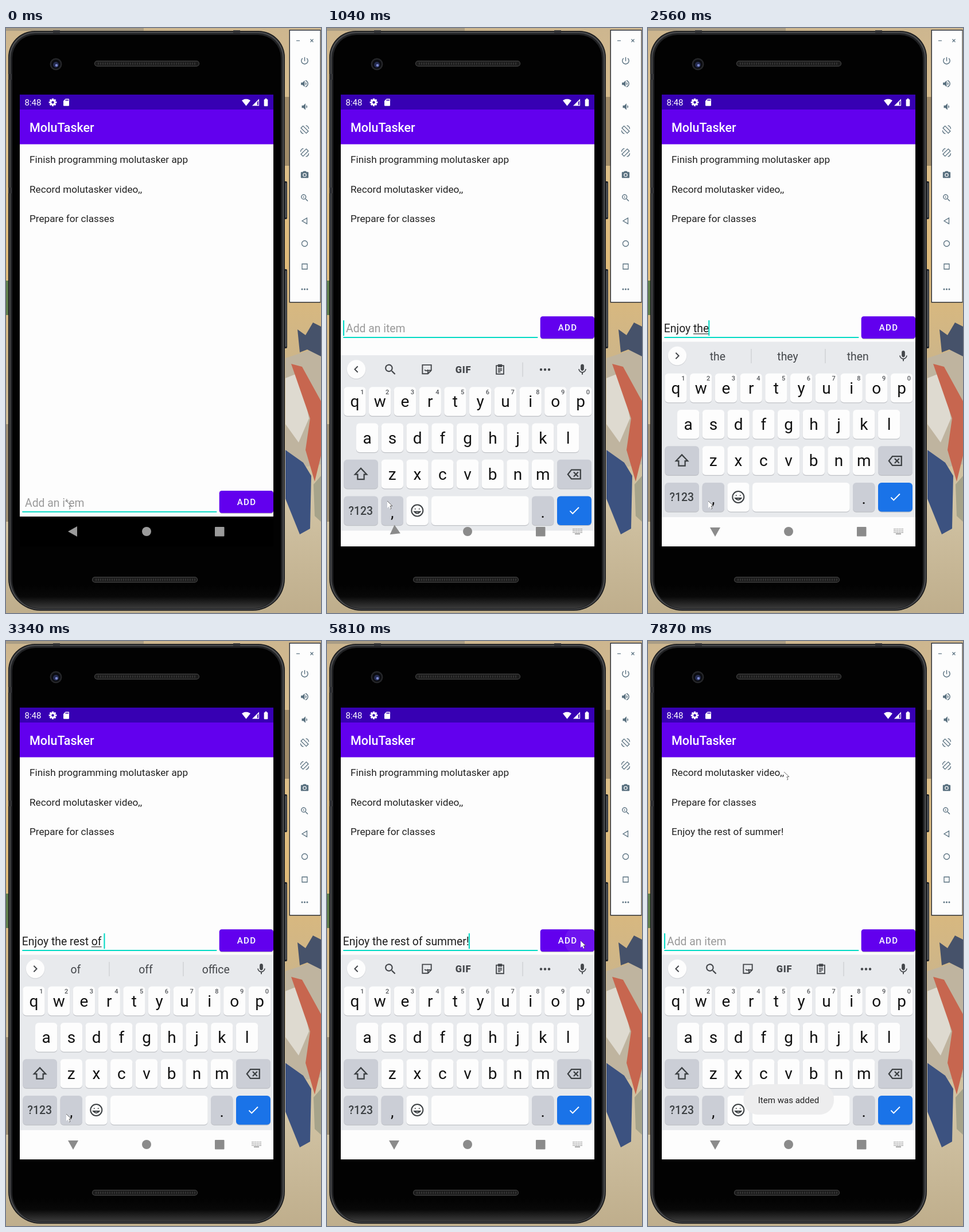
An HTML page with a canvas that plays this animation: 549x1019 px, repeating every 8 s.

```html
<!DOCTYPE html>
<html lang="en">
<head>
<meta charset="utf-8">
<title>Todo list</title>
<style>
  html, body { margin: 0; width: 100%; height: 100%; overflow: hidden; background: #d9bd8b; }
  canvas { display: block; width: 549px; height: 1019px; }
</style>
</head>
<body>
<canvas id="stage" width="549" height="1019"></canvas>
<script>
const ctx = document.getElementById('stage').getContext('2d');
const LOOP = 8000;
const FONT = 'Roboto, "Noto Sans", sans-serif';
const ROW = 51.6;
const TYPED = 'Enjoy the rest of summer!';
const ITEMS = ['Finish programming molutasker app', 'Record molutasker video,,',
  'Prepare for classes', 'Enjoy the rest of summer!'];

const ICONS = {
  power: 'M13 3h-2v10h2V3zm4.83 2.17l-1.42 1.42C17.99 7.86 19 9.81 19 12c0 3.87-3.13 7-7 7s-7-3.13-7-7c0-2.19 1.01-4.14 2.58-5.42L6.17 5.17C4.23 6.82 3 9.26 3 12c0 4.97 4.03 9 9 9s9-4.03 9-9c0-2.74-1.23-5.18-3.17-6.83z',
  louder: 'M3 9v6h4l5 5V4L7 9H3zm13.5 3c0-1.77-1.02-3.29-2.5-4.03v8.05c1.48-.73 2.5-2.25 2.5-4.02zM14 3.23v2.06c2.89.86 5 3.54 5 6.71s-2.11 5.85-5 6.71v2.06c4.01-.91 7-4.49 7-8.77s-2.99-7.86-7-8.77z',
  quieter: 'M18.5 12c0-1.77-1.02-3.29-2.5-4.03v8.05c1.48-.73 2.5-2.25 2.5-4.02zM5 9v6h4l5 5V4L9 9H5z',
  camera: 'M9 2L7.17 4H4c-1.1 0-2 .9-2 2v12c0 1.1.9 2 2 2h16c1.1 0 2-.9 2-2V6c0-1.1-.9-2-2-2h-3.17L15 2H9zm3 15a5 5 0 1 1 0-10 5 5 0 0 1 0 10zm0-8a3.2 3.2 0 1 0 0 6.4 3.2 3.2 0 0 0 0-6.4z',
  search: 'M15.5 14h-.79l-.28-.27A6.5 6.5 0 1 0 13.73 14.43l.27.28v.79l5 4.99L20.49 19zM9.5 14a4.5 4.5 0 1 1 0-9 4.5 4.5 0 0 1 0 9z',
  plus: 'M9 7h1v2h2v1h-2v2h-1v-2h-2v-1h2z',
  mic: 'M12 14c1.66 0 3-1.34 3-3V5c0-1.66-1.34-3-3-3S9 3.34 9 5v6c0 1.66 1.34 3 3 3zm5.3-3c0 3-2.54 5.1-5.3 5.1S6.7 14 6.7 11H5c0 3.41 2.72 6.23 6 6.72V21h2v-3.28c3.28-.48 6-3.3 6-6.72z',
  card: 'M18 2h-8L4 8v12c0 1.1.9 2 2 2h12c1.1 0 2-.9 2-2V4c0-1.1-.9-2-2-2zm-6 6h-2V4h2zm3 0h-2V4h2zm3 0h-2V4h2z',
  wifi: 'M12 21.5L.4 7C.9 6.6 5 3 12 3s11.2 3.6 11.6 4z',
  signal: 'M2 22H22V2zM17 20V11l3-4v13z',
  battery: 'M15.7 4H14V2h-4v2H8.3C7.6 4 7 4.6 7 5.3v15.4c0 .7.6 1.3 1.3 1.3h7.4c.7 0 1.3-.6 1.3-1.3V5.3c0-.7-.6-1.3-1.3-1.3z',
  check: 'M9 16.2L4.8 12l-1.4 1.4L9 19 21 7l-1.4-1.4z',
  shift: 'M12 3L21 12.5H17V20H7V12.5H3z',
  erase: 'M8 5H22V19H8L2.5 12zM11.5 8.5l7 7M18.5 8.5l-7 7',
  left: 'M15 6l-6 6 6 6',
  right: 'M9 6l6 6-6 6',
  clip: 'M5 5H19V21H5zM9 3.5h6V7H9zM8 11h8M8 14h8M8 17h5',
  sticker: 'M4 4H20V14L14 20H4zM20 14h-6v6M8 9h.1M15 9h.1M8 13q3 3.5 6 0',
  smile: 'M22 12a10 10 0 1 1-20 0 10 10 0 0 1 20 0zM8.5 8.5v1.5M15.5 8.5v1.5M7 14q5 6 10 0z',
  turn: 'M8 3L21 16L16 21L3 8zM15 2a9 9 0 0 1 7 8M9 22a9 9 0 0 1-7-8'
};
for (const name in ICONS) ICONS[name] = new Path2D(ICONS[name]);

// [time, value] steps
const typedLength = [[0, 0], [1540, 1], [1690, 2], [1810, 4], [1930, 5], [2080, 6], [2200, 7],
  [2320, 8], [2440, 9], [2680, 10], [2830, 11], [2950, 12], [3100, 14], [3220, 16], [3340, 18],
  [3460, 19], [3580, 20], [3700, 21], [3940, 22], [4060, 23], [4180, 24], [4480, 25], [5930, 0]];
const hints = [[0, ''], [1540, 'E Ex Even'], [1690, 'En End Enjoy'], [1810, 'Enj Enjoy Enjoyed'],
  [1930, 'Enjo Enjoy Enjoyed'], [2080, 'Enjoy Enjoyed Enjoys'], [2200, 't the to'],
  [2320, 'th the that'], [2440, 'the they then'], [2830, 'r are right'], [2950, 're read rest'],
  [3100, 'rest rests restaurant'], [3340, 'of off office'], [3460, 's so see'], [3580, 'su such sure'],
  [3700, 'sum summer sums'], [3940, 'summ summer summary'], [4180, 'summe summer summary'],
  [4330, 'summer summers summaries'], [4480, '']];
const caretOn = [[0, false], [120, true], [620, false], [740, true], [5150, false], [5560, true],
  [6470, false], [6830, true], [7330, false], [7870, true]];
const pointer = [[0, [105, 824]], [5000, [298, 726]], [5150, [394, 616]], [5290, [452, 540]],
  [5440, [446, 528]], [5560, [442, 522]], [6170, [400, 376]], [6320, [250, 269]],
  [6470, [241, 234]], [6590, [237, 228]]];
const keyboardDrop = [[0, null], [1040, 23.5], [1160, 5], [1280, 0]];
const backTurn = [[0, 0], [890, 8], [1040, 35], [1160, 75], [1280, 90]];
const ripple = [[0, 0], [5810, 28], [5930, 80], [6050, 0]];
const newItemAlpha = [[0, 0], [5930, 0.4], [6050, 1]];
const toastAlpha = [[0, 0], [6050, 0.35], [6170, 0.75], [6320, 1]];
const firstItemAlpha = [[0, 1], [7330, 0.5], [7450, 0]];
const listShift = [[0, 0], [7600, 27], [7750, ROW]];

function at(steps, t) {
  let value = steps[0][1];
  for (const [time, next] of steps) if (t >= time) value = next;
  return value;
}

function box(x, y, w, h, color, r = 0) {
  ctx.fillStyle = color;
  ctx.beginPath();
  ctx.roundRect(x, y, w, h, r);
  ctx.fill();
}

function disc(x, y, r, color) {
  ctx.fillStyle = color;
  ctx.beginPath();
  ctx.arc(x, y, r, 0, Math.PI * 2);
  ctx.fill();
}

function poly(points, color) {
  ctx.fillStyle = color;
  ctx.beginPath();
  for (let i = 0; i < points.length; i += 2) ctx.lineTo(points[i], points[i + 1]);
  ctx.fill();
}

function label(text, x, y, size, color, { weight = 400, align = 'left', spacing = 0 } = {}) {
  ctx.font = `${weight} ${size}px ${FONT}`;
  ctx.textAlign = align;
  ctx.letterSpacing = spacing + 'px';
  ctx.fillStyle = color;
  ctx.fillText(text, x, y);
}

function icon(name, x, y, size, color, stroke = 0, flip = 1) {
  ctx.save();
  ctx.translate(x, y);
  ctx.scale(flip * size / 24, size / 24);
  ctx.translate(-12, -12);
  if (stroke) {
    ctx.strokeStyle = color;
    ctx.lineWidth = stroke;
    ctx.stroke(ICONS[name]);
  } else {
    ctx.fillStyle = color;
    ctx.fill(ICONS[name], 'evenodd');
  }
  ctx.restore();
}

function faded(alpha, draw) {
  if (!alpha) return;
  ctx.globalAlpha = alpha;
  draw();
  ctx.globalAlpha = 1;
}

function verticalFade(y0, y1, ...colors) {
  const fade = ctx.createLinearGradient(0, y0, 0, y1);
  colors.forEach((c, i) => fade.addColorStop(i / (colors.length - 1), c));
  return fade;
}

function drawWallpaper() {
  box(0, 0, 549, 1019, verticalFade(0, 1019, '#cdb68f', '#dcc08c', '#dfba79', '#c9b48c', '#d2c4a5', '#bfae8c'));
  box(0, 0, 240, 5, '#a99c84');
  box(0, 440, 5, 60, '#5f7d4c');
  box(0, 690, 5, 170, '#9c8d72');
  box(486, 120, 9, 120, '#a08b68');
  poly([487, 575, 549, 555, 549, 760, 487, 770], '#bfb49f');
  poly([508, 525, 522, 535, 535, 513, 549, 520, 549, 572, 525, 560, 512, 565], '#46526a');
  poly([487, 610, 512, 600, 528, 680, 510, 722, 487, 690], '#dedad0');
  poly([497, 585, 516, 590, 549, 650, 549, 745, 538, 790, 522, 735, 530, 680], '#c7664f');
  poly([487, 735, 518, 757, 532, 780, 530, 872, 512, 882, 487, 820], '#3c5280');
  poly([536, 795, 549, 780, 549, 860, 538, 850], '#a6a38a');
}

function speaker(x, y, w) {
  box(x, y, w, 10, '#4b4b4b', 5);
  box(x + 1, y + 1, w - 2, 8, '#1c1c1c', 4);
  for (let i = x + 6; i < x + w - 5; i += 4) box(i, y + 3, 2, 4, '#333');
}

function drawPhone() {
  for (const [y, h] of [[267, 66], [420, 138]]) {
    box(483, y, 7, h, '#20242a', 2);
    box(487, y + 3, 1.5, h - 6, '#6a6d70');
  }
  box(4, 5, 482, 1010, '#17181a', [46, 46, 56, 56]);
  box(5.5, 6.5, 479, 1007, '#48494b', [45, 45, 55, 55]);
  box(8, 9, 474, 1003, '#202123', [43, 43, 53, 53]);
  box(11, 12, 468, 999, verticalFade(970, 1011, '#020202', '#080808', '#3b3b3b'), [40, 40, 50, 50]);
  for (const y of [80, 278]) box(4, y, 6, 10, '#303134');
  box(396, 4, 12, 5, '#303134');
  box(82, 4, 12, 5, '#303134');
  disc(87, 63, 10.5, '#252629');
  disc(87, 63, 8, '#0b0c10');
  disc(87, 64, 5, '#252c50');
  disc(88, 65, 2.3, '#7c88cf');
  speaker(154, 57, 183);
  speaker(150, 956, 184);
}

function drawPanel() {
  const slate = '#5a7180';
  box(493.5, 3, 55, 475.5, '#30343c');
  box(495, 4.5, 52.5, 472.5, '#fdfdfd');
  box(506, 21.5, 6, 1.2, slate);
  ctx.strokeStyle = slate;
  ctx.lineWidth = 1.2;
  ctx.stroke(new Path2D('M530.5 19.5l5 5M535.5 19.5l-5 5'));
  icon('power', 520.5, 57, 17, slate);
  icon('louder', 520.5, 97, 17, slate);
  icon('quieter', 520.5, 137, 17, slate);
  icon('turn', 520.5, 177, 17, slate, 1.9);
  icon('turn', 520.5, 217, 17, slate, 1.9, -1);
  icon('camera', 520.5, 256, 16, slate);
  icon('search', 520.5, 296, 17, slate);
  icon('plus', 520.5, 296, 17, slate);
  ctx.strokeStyle = slate;
  ctx.lineWidth = 1.3;
  ctx.stroke(new Path2D('M516 336l8.5-5v10zM525.5 375.5a5 5 0 1 1-10 0 5 5 0 0 1 10 0zM516 411h9v9h-9z'));
  for (const dx of [-4.5, 0, 4.5]) disc(520.5 + dx, 455, 1.5, slate);
}

function drawGear(x, y) {
  for (let i = 0; i < 8; i++) {
    ctx.save();
    ctx.translate(x, y);
    ctx.rotate(i * Math.PI / 4);
    box(-1.6, -6.8, 3.2, 4, '#fff', 0.5);
    ctx.restore();
  }
  disc(x, y, 5, '#fff');
  disc(x, y, 2.2, '#3700b3');
}

function drawBars() {
  box(24, 116, 442, 26, '#3700b3');
  box(24, 142, 442, 60.5, '#6200ee');
  label('8:48', 32.5, 135.3, 15.05, '#fff');
  drawGear(81.5, 129.5);
  icon('card', 105, 129.5, 15, '#fff');
  icon('wifi', 418.5, 129.5, 15.5, '#fff');
  icon('signal', 435, 129.5, 14.5, '#fff');
  icon('battery', 453, 129.5, 16, '#fff');
  label('MoluTasker', 41, 181, 21.5, '#fff', { weight: 500 });
}

function drawList(t) {
  const shift = at(listShift, t);
  const alphas = [at(firstItemAlpha, t), 1, 1, at(newItemAlpha, t)];
  ITEMS.forEach((item, i) => faded(alphas[i], () =>
    label(item, 41, 235 + i * ROW - (i ? shift : 0), 17.2, '#212121')));
}

function drawEntry(t, lift) {
  const y = 834 - lift;
  const text = TYPED.slice(0, at(typedLength, t));
  const left = 27.8;
  if (text) label(text, left, y, 19.36, '#1f1f1f');
  else label('Add an item', left + 5.2, y, 19.36, '#9a9a9a');
  const caretX = text ? left + ctx.measureText(text).width : 29;
  if (text && !text.endsWith('!')) {
    const word = text.trimEnd();
    const from = ctx.measureText(word.slice(0, word.lastIndexOf(' ') + 1)).width;
    box(left + from, y + 2, ctx.measureText(word).width - from, 1.1, '#1f1f1f');
  }
  box(28.3, y + 7.7, 339, 2.1, '#03dac5');
  if (at(caretOn, t)) box(caretX - 1, y - 21, 2.1, 27, '#03dac5');

  const top = 806 - lift;
  box(372, top + 1, 94, 39, 'rgba(0,0,0,.22)', 4.3);
  box(371.7, top, 94.3, 38.7, '#6200ee', 4.3);
  const r = at(ripple, t);
  if (r) {
    ctx.save();
    ctx.beginPath();
    ctx.roundRect(371.7, top, 94.3, 38.7, 4.3);
    ctx.clip();
    disc(442, 522, r, 'rgba(255,255,255,.08)');
    ctx.restore();
  }
  label('ADD', 419.6, top + 25, 15.05, '#fff', { weight: 500, align: 'center', spacing: 1.34 });
}

function key(x, y, w, color = '#fdfdfd') {
  box(x, y + 1.2, w, 50.5, '#bfc1c6', 6);
  box(x, y, w, 50.5, color, 6);
}

function letterRow(letters, x, y) {
  [...letters].forEach((letter, i) => {
    const keyX = x + i * 43.73;
    key(keyX, y, 38.4);
    label(letter, keyX + 19.2, y + 35, 28, '#111', { align: 'center' });
  });
}

function drawToolbar(words) {
  const ink = '#44474b';
  disc(51, 572, 16.5, '#d3d5d9');
  disc(51, 571, 16.2, '#fdfdfd');
  icon('mic', 445, 571.5, 23, ink);
  if (words) {
    icon('right', 51, 571, 21, ink, 2.2);
    words.split(' ').forEach((word, i) =>
      label(word, 121.3 + i * 122.2, 579, 19.36, ink, { align: 'center' }));
    box(179.5, 559, 1, 25, '#c3c5c9');
    box(308.5, 559, 1, 25, '#c3c5c9');
    return;
  }
  icon('left', 51, 571, 21, ink, 2.2);
  icon('search', 110.5, 571.5, 25, ink);
  icon('sticker', 174, 571, 23, ink, 2);
  label('GIF', 237.5, 577, 16.5, ink, { weight: 900, align: 'center', spacing: 0.8 });
  icon('clip', 301.5, 571, 22, ink, 2);
  box(340.5, 559, 1, 25, '#c3c5c9');
  for (const dx of [-7, 0, 7]) disc(380 + dx, 571.5, 2.2, ink);
}

function drawKeyboard(t, drop) {
  const ink = '#3c4043', grey = '#cbced6';
  ctx.save();
  ctx.translate(0, drop);
  box(24, 546.5, 442, 305.5, '#e8eaed');
  drawToolbar(at(hints, t));
  letterRow('qwertyuiop', 29.3, 601.7);
  for (let i = 0; i < 10; i++)
    label((i + 1) % 10, 61.3 + i * 43.73, 614.3, 11, '#55585c', { weight: 500, align: 'center' });
  letterRow('asdfghjkl', 51, 665);
  letterRow('zxcvbnm', 94.6, 728.3);
  key(29.3, 728.3, 59.6, grey);
  icon('shift', 59, 753.5, 27, ink, 2);
  key(401, 728.3, 60, grey);
  icon('erase', 430.5, 754, 27, ink, 2);
  key(29.3, 792, 59.6, grey);
  label('?123', 58.8, 824, 19.4, ink, { weight: 500, align: 'center' });
  key(94.6, 792, 38.4, grey);
  label(',', 113.8, 829, 28, '#111', { align: 'center' });
  key(138.3, 792, 38.4);
  icon('smile', 157.3, 817, 24, ink, 2);
  key(182, 792, 169.7);
  key(357, 792, 38.4, grey);
  label('.', 376.2, 829, 28, '#111', { align: 'center' });
  key(401, 792, 60, '#1a73e8');
  icon('check', 431, 817, 23, '#fff');
  ctx.restore();
}

function drawNav(t) {
  const grey = at(keyboardDrop, t) === null ? '#9b9b9b' : '#8b8b8b';
  ctx.save();
  ctx.translate(117, 877);
  ctx.rotate(-at(backTurn, t) * Math.PI / 180);
  poly([-9, 0, 7, -9, 7, 9], grey);
  ctx.restore();
  disc(245, 877, 8, grey);
  box(364, 869, 16.5, 16.5, grey, 1);
  if (t < 890) return;
  for (let row = 0; row < 3; row++)
    for (let col = 0; col < 6; col++) box(428.5 + col * 2.9, 872 + row * 2.9, 1.6, 1.6, grey);
  box(432, 880.5, 9, 1.5, grey);
}

function drawToast(t) {
  faded(at(toastAlpha, t), () => {
    box(166.5, 772, 157.5, 53, '#ededee', 25);
    label('Item was added', 245, 805, 15.05, '#222', { align: 'center' });
  });
}

function drawPointer(t) {
  const [x, y] = at(pointer, t);
  ctx.save();
  ctx.translate(x, y);
  poly([0, 0, 0, 12, 3, 9.5, 5, 14, 7, 13, 5, 8.7, 9, 8.5], '#fff');
  ctx.strokeStyle = '#444';
  ctx.lineWidth = 0.8;
  ctx.stroke(new Path2D('M0 0L9 8.5 5 8.7 7 13 5 14'));
  ctx.restore();
}

function draw(t) {
  const drop = at(keyboardDrop, t);
  const open = drop !== null;
  drawWallpaper();
  drawPhone();
  drawPanel();
  box(24, 116, 442, 787, '#000');
  box(24, 202, 442, open ? 701 : 649, '#fdfdfd');
  drawBars();
  drawList(t);
  drawEntry(t, open ? 303.8 : 0);
  if (open) drawKeyboard(t, drop);
  drawNav(t);
  drawToast(t);
  drawPointer(t);
}

function tick() {
  draw(performance.now() % LOOP);
  requestAnimationFrame(tick);
}
tick();
</script>
</body>
</html>
```
